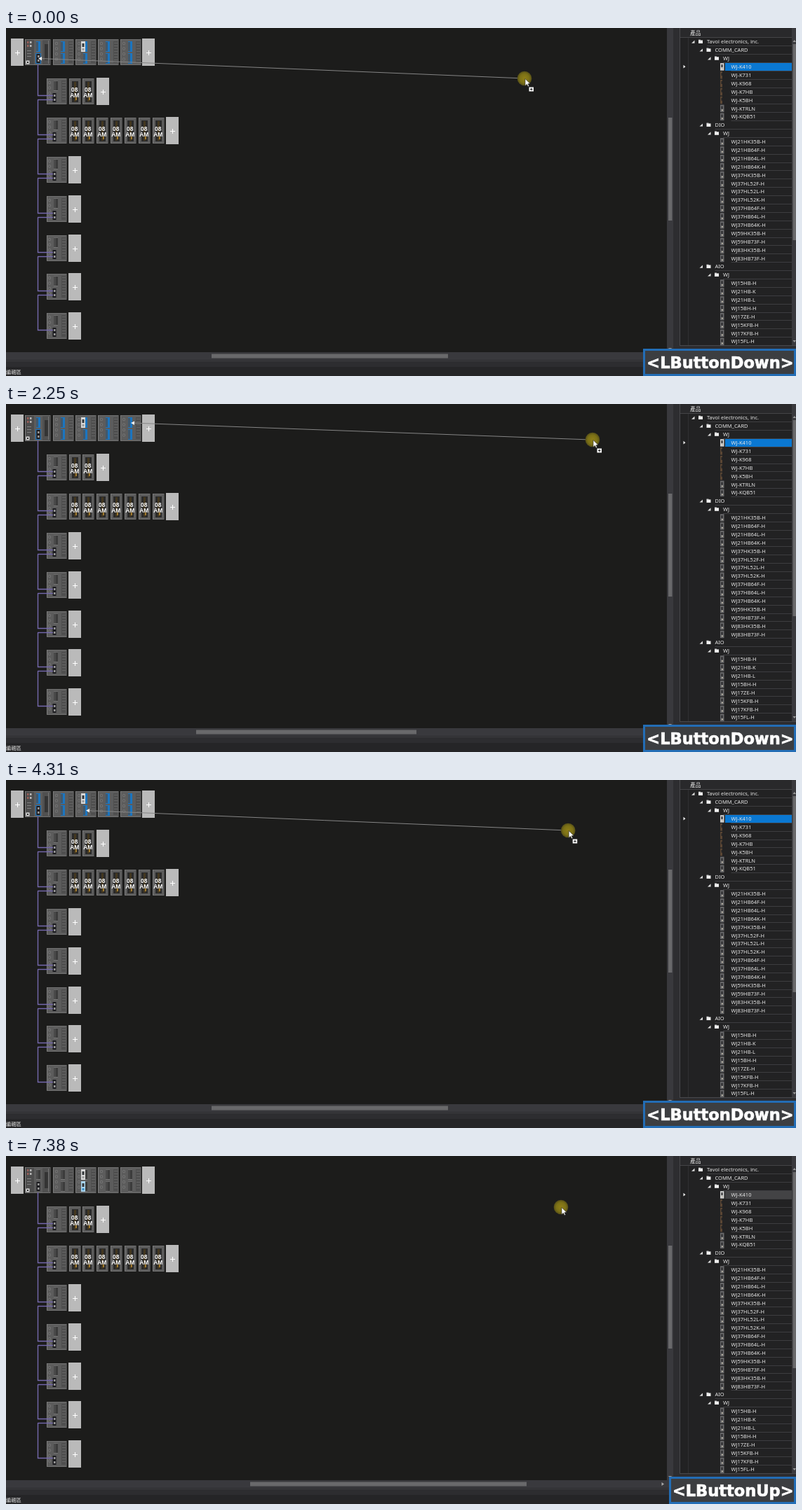
Recreate the animation shown at these times as an HTML page with a canvas. Size 1126 by 497 pixels, loop 7850 ms.

```html
<!DOCTYPE html>
<html lang="en">
<head>
<meta charset="utf-8">
<title>Hardware configuration drag and drop</title>
<style>
  html, body { margin: 0; height: 100%; overflow: hidden; background: #1c1c1b; }
  canvas { display: block; }
</style>
</head>
<body>
<canvas id="stage" width="1126" height="497"></canvas>
<script>
const ctx = document.getElementById('stage').getContext('2d');
const LOOP = 7850, RELEASE = 5180, DROP = 5500, LAG = 80;
const UI = '"Noto Sans", "Noto Sans CJK TC", "Noto Sans CJK JP", sans-serif';

// Pointer position: time, x, y
const PATH = [
  [990, 739, 72], [1300, 742, 60], [1640, 757, 51], [1760, 803, 51], [1840, 803, 51],
  [2010, 828, 51], [2160, 832, 51], [2250, 836, 51], [2730, 837, 51], [2930, 846, 80],
  [3120, 845, 68], [3360, 845, 68], [3930, 772, 71], [4070, 772, 71], [4310, 801, 72],
  [4400, 819, 72], [4560, 791, 73]
];

// Tree levels start with one dot per depth; leaves have three dots.
const TREE = `Tavol electronics, inc.
.COMM_CARD
..WJ
...WJ-K410
...WJ-K731
...WJ-K968
...WJ-K7HB
...WJ-K5BH
...WJ-KTRLN
...WJ-KQB51
.DIO
..WJ
...WJ21HK35B-H
...WJ21HB64F-H
...WJ21HB64L-H
...WJ21HB64K-H
...WJ37HK35B-H
...WJ37HL52F-H
...WJ37HL52L-H
...WJ37HL52K-H
...WJ37HB64F-H
...WJ37HB64L-H
...WJ37HB64K-H
...WJ59HK35B-H
...WJ59HB73F-H
...WJ83HK35B-H
...WJ83HB73F-H
.AIO
..WJ
...WJ15HB-H
...WJ21HB-K
...WJ21HB-L
...WJ15BH-H
...WJ17ZE-H
...WJ15KFB-H
...WJ17KFB-H
...WJ15FL-H`.split('\n');

function rect(x, y, w, h, color) {
  ctx.fillStyle = color;
  ctx.fillRect(x, y, w, h);
}

function frame(x, y, w, h, color, width = 1) {
  ctx.strokeStyle = color;
  ctx.lineWidth = width;
  ctx.strokeRect(x, y, w, h);
}

function line(points, color, width = 1) {
  ctx.beginPath();
  points.forEach(([x, y]) => ctx.lineTo(x, y));
  ctx.strokeStyle = color;
  ctx.lineWidth = width;
  ctx.stroke();
}

function shape(points, color) {
  ctx.beginPath();
  points.forEach(([x, y]) => ctx.lineTo(x, y));
  ctx.fillStyle = color;
  ctx.fill();
}

function dot(x, y, r, color) {
  ctx.beginPath();
  ctx.arc(x, y, r, 0, 7);
  ctx.fillStyle = color;
  ctx.fill();
}

function text(s, x, y, font, color = '#e6e6e6', align = 'left') {
  ctx.font = font;
  ctx.fillStyle = color;
  ctx.textAlign = align;
  ctx.fillText(s, x, y);
}

function pointerAt(t) {
  if (t <= PATH[0][0]) return PATH[0].slice(1);
  const i = PATH.findIndex(key => key[0] > t);
  if (i < 0) return PATH[PATH.length - 1].slice(1);
  const [t0, x0, y0] = PATH[i - 1], [t1, x1, y1] = PATH[i];
  const k = (t - t0) / (t1 - t0);
  return [x0 + (x1 - x0) * k, y0 + (y1 - y0) * k];
}

function plusTile(x, y) {
  rect(x, y, 18, 39, '#bababa');
  rect(x + 6, y + 20, 7, 1, '#fff');
  rect(x + 9, y + 17, 1, 7, '#fff');
}

function body(x, y, w, h) {
  rect(x, y, w, h, '#5c5c5c');
  rect(x, y, 1, h, '#7d7d7d');
  rect(x + 1, y, w - 2, 1, '#717171');
  rect(x, y + h - 1, w, 1, '#737373');
  rect(x + w - 1, y, 1, h, '#454545');
}

function slot(x, y, active) {
  rect(x - 2, y, 6, 15, active ? '#41586c' : '#4a4a4a');
  rect(x + 1, y, 3, 15, active ? '#1b75c0' : '#3c3c3c');
  rect(x - 2, y + 14, 6, 1, active ? '#1b75c0' : '#777');
  rect(x - 2, y, 6, 1, active ? '#1b75c0' : '#6b6b6b');
}

function card(x, y, tinted) {
  rect(x - 3, y, 6, 15, tinted ? '#a9d4ee' : '#d8d8d8');
  rect(x - 1.5, y + 3, 3, 5, '#34383b');
  rect(x - 1.5, y + 10, 3, 3, tinted ? '#3a8fc8' : '#9b9b9b');
}

function dials(x, y) {
  for (let i = 0; i < 4; i++) {
    dot(x, y + i * 7.5, 2.2, '#727272');
    dot(x, y + i * 7.5, 1.1, '#565656');
  }
}

function ports(x, y) {
  rect(x - 2.5, y, 5, 13, '#1a1a1e');
  rect(x - 1, y + 2, 2.5, 3, '#999');
  rect(x - 1, y + 8, 2.5, 3, '#999');
}

function fins(x, y, h) {
  rect(x, y, 6, h, '#4f4f4f');
  for (let i = 2; i < h - 1; i += 4) rect(x + 1, y + i, 5, 1, '#666');
}

function cpu(active) {
  body(27, 16, 37, 37);
  rect(28, 17, 12, 35, '#4c4c4c');
  for (let i = 0; i < 4; i++) rect(30 + i % 2 * 4, 19 + (i >> 1) * 5, 2.5, 3, i % 2 ? '#b5b5b5' : '#995f59');
  for (let i = 0; i < 3; i++) rect(30, 32 + i * 4, 6, 1, '#818181');
  rect(28.5, 46.5, 5, 5, '#ddd');
  rect(30, 48, 2, 2, '#222');
  slot(45, 19, active);
  if (active) frame(42.5, 36.5, 7, 14, '#1b75c0');
  ports(46, 37);
  rect(52, 17, 11, 35, '#505050');
  rect(55, 23, 5, 23, '#343434');
  rect(60, 18, 1, 33, '#757575');
}

function mainRack(active, dropped) {
  plusTile(7, 15);
  cpu(active);
  for (let i = 0; i < 4; i++) {
    const x = 67 + i * 32;
    body(x, 16, 30, 37);
    dials(x + 5, 22);
    fins(x + 22, 19, 31);
    slot(x + 13, 19, active);
    slot(x + 13, 36, active);
  }
  card(110, 19, false);
  if (dropped) card(110, 36, true);
  plusTile(194, 15);
}

function remoteRack(index) {
  const rowY = i => Math.round(71.1 + i * 55.85) + 1;
  const y = rowY(index), modules = [2, 7][index] || 0;
  const top = index ? rowY(index - 1) + 30.5 : 52;
  body(58, y, 29, 37);
  dials(62, y + 6);
  slot(70, y + 3, false);
  fins(79, y + 3, 31);
  ports(69, y + 21);
  line([[45.5, top], [45.5, y + 24.5], [67, y + 24.5]], '#7468ad', 1.4);
  if (index < 6) line([[67, y + 30.5], [45, y + 30.5]], '#7468ad', 1.4);
  for (let i = 0; i < modules; i++) {
    const x = Math.round(89.5 + i * 19.95);
    body(x, y, 17, 37);
    rect(x + 4, y + 4, 9, 30, '#2a2a2a');
    rect(x + 7, y + 5, 3, 28, '#43371f');
    rect(x + 9, y + 27, 2, 4, '#a17a2d');
    const font = 'bold 8.4px "Liberation Sans", sans-serif';
    text('08', x + 7.7, y + 18.6, font, '#fff', 'center');
    text('AM', x + 7.7, y + 27.2, font, '#fff', 'center');
  }
  plusTile(Math.round(89 + modules * 19.9), y - 1);
}

function tree(focused) {
  rect(951, 0, 175, 463, '#2d2d30');
  rect(960, 0, 160, 453, '#222223');
  rect(960, 0, 1, 453, '#48484b');
  rect(961, 0, 159, 13, '#29292b');
  rect(961, 13, 159, 1, '#444447');
  rect(972, 14, 1, 439, '#303033');
  text('產品', 975, 9.7, '7.8px ' + UI);
  TREE.forEach((row, i) => {
    const depth = row.lastIndexOf('.', 2) + 1, name = row.slice(depth);
    const x = 999 + depth * 11.5, y = 19.5 + i * 11.89;
    rect(x, Math.round(y + 5.6), 1120 - x, 1, '#3d3d40');
    if (depth < 3) {
      shape([[x - 17.5, y - 2], [x - 17.5, y + 2.2], [x - 22, y + 2.2]], '#ddd');
      rect(x - 12, y - 2, 6, 4.5, '#f0f0f0');
      rect(x - 12, y - 2.8, 3, 1, '#f0f0f0');
    } else {
      if (i === 3) rect(1025, 50, 95, 11, focused ? '#0a78d2' : '#434345');
      const narrow = i > 3 && i < 8;
      rect(1018, y - 5, narrow ? 3 : 5.5, 10.5, i === 3 ? '#cfcfcf' : narrow ? '#5a4634' : '#68686a');
      rect(1019.5, y - 3, 2, 4, '#252527');
      if (!narrow) rect(1020, y + 2, 2, 1.5, '#c2bcaa');
    }
    text(name, x, y + 2.9, '7.5px ' + UI);
  });
  shape([[965.5, 52.8], [968.5, 55.2], [965.5, 57.6]], '#eee');
  rect(1120, 0, 6, 453, '#39393d');
  rect(1121.5, 23, 4.5, 280, '#69696b');
  shape([[1121.5, 20], [1126, 20], [1123.8, 17]], '#999');
  shape([[1121.5, 446], [1126, 446], [1123.8, 449]], '#999');
  rect(960, 453, 166, 1, '#48484b');
}

function chrome(thumb) {
  rect(942, 0, 9, 463, '#39393d');
  rect(944, 128, 5.5, 147, '#69696b');
  shape([[944, 457], [949, 457], [946.5, 460]], '#999');
  rect(0, 463, 951, 11, '#39393d');
  rect(thumb[0], 465.5, thumb[1] - thumb[0], 6, '#69696b');
  shape([[934.5, 466], [934.5, 471], [938, 468.5]], '#aaa');
  rect(0, 474, 1126, 23, '#2d2d30');
  rect(0, 475, 1126, 1, '#3d3d40');
  rect(0, 484, 1126, 13, '#252527');
  text('編輯區', 0, 493.8, '7.2px ' + UI);
}

function dragLine([x, y]) {
  const column = [757, 784, 811, 830].filter(edge => x > edge).length;
  const tx = column ? 51 + column * 32 : 47, ty = y < 60 ? 27 : 43.5;
  line([[tx, ty], [x, y]], '#858585', 1);
  ctx.save();
  ctx.translate(tx - 1, ty);
  ctx.rotate(Math.atan2(y - ty, x - tx));
  shape([[0, 0], [5, -2.7], [5, 2.7]], '#f2f2f2');
  ctx.restore();
}

function pointer([x, y], dragging) {
  const glow = ctx.createRadialGradient(x, y, 0, x, y, 10.5);
  glow.addColorStop(0, '#8f7f18');
  glow.addColorStop(0.65, '#7b7016');
  glow.addColorStop(1, '#544d18');
  dot(x, y, 10.3, glow);
  const tip = [[0, 0], [0, 10], [2.4, 7.8], [4, 11.2], [5.5, 10.5], [4, 7.2], [7, 7]];
  const outline = tip.map(([dx, dy]) => [x + 1 + dx, y + 0.5 + dy]);
  shape(outline, '#fff');
  line([...outline, outline[0]], '#222', 0.6);
  if (dragging) {
    rect(x + 6.5, y + 12.5, 6.5, 6, '#fff');
    rect(x + 8, y + 15, 3.5, 1, '#222');
    rect(x + 9.3, y + 13.8, 1, 3.5, '#222');
  }
}

function keyLabel(released) {
  const left = released ? 945 : 908;
  const label = released ? '<LButtonUp>' : '<LButtonDown>';
  rect(left, 458, 1126 - left, 39, '#3c3e41');
  frame(left + 1.5, 459.5, 1123 - left, 36, '#236db5', 3);
  text(label, 1122.5, 486, 'bold 22.5px "DejaVu Sans", sans-serif', '#fff', 'right');
  ctx.strokeStyle = '#fff';
  ctx.lineWidth = 0.7;
  ctx.strokeText(label, 1122.5, 486);
}

function draw(t) {
  const dragging = t < DROP, end = pointerAt(t - LAG);
  rect(0, 0, 1126, 497, '#1c1c1b');
  mainRack(dragging, !dragging);
  for (let i = 0; i < 7; i++) remoteRack(i);
  chrome(!dragging ? [348, 742] : end[0] > 830 ? [271, 585] : [293, 630]);
  tree(dragging);
  if (dragging) dragLine(end);
  pointer(pointerAt(t), dragging);
  keyLabel(t >= RELEASE);
}

const start = performance.now();
function tick() {
  draw((performance.now() - start) % LOOP);
  requestAnimationFrame(tick);
}
tick();
</script>
</body>
</html>
```
